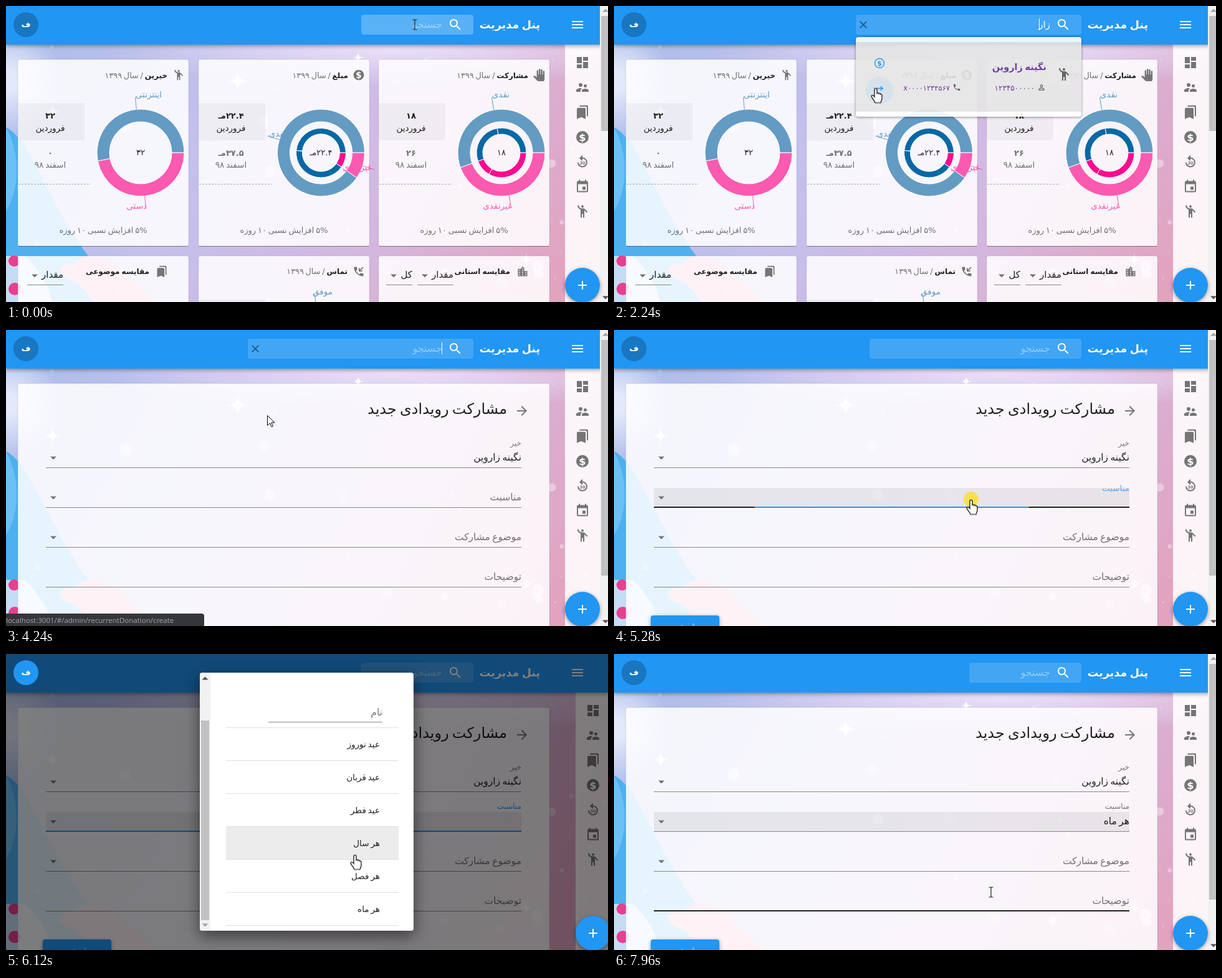
Write an HTML page that moves like this. It is 966 px wide and 476 px high and loops after 8 s.

```html
<!DOCTYPE html>
<html lang="fa">
<head>
<meta charset="utf-8">
<title>پنل مدیریت</title>
<style>
html, body { margin: 0; width: 100%; height: 100%; overflow: hidden; }
svg {
  display: block; width: 966px; height: 476px;
  background:
    radial-gradient(90px 90px at 0 120px, #e3e8fa 20%, #e3e8fa00),
    radial-gradient(460px 60px at 620px 70px, #e9e0f8, #e9e0f800),
    linear-gradient(118deg, #a9bdea, #c3c0ec 35%, #d3b9e2 62%, #e2a3bf 92%);
}
text { font-family: "DejaVu Sans", sans-serif; direction: rtl; word-spacing: -.1em; fill: #000; fill-opacity: .87; }
.dim { fill-opacity: .54; }
.b { font-weight: 700; }
.mid { text-anchor: middle; }
.white { fill: #fff; fill-opacity: 1; }
.hint { fill: #fff; fill-opacity: .42; }
.blue { fill: #649bc3; fill-opacity: 1; }
.pink { fill: #fb5ab1; fill-opacity: 1; }
.link { fill: #551a8b; fill-opacity: .9; }
.red { fill: #f44336; fill-opacity: 1; }
.primary { fill: #2196f3; fill-opacity: 1; }
.ltr { direction: ltr; font-family: "Open Sans", sans-serif; fill: #a2a6ab; fill-opacity: 1; }
.shade { filter: drop-shadow(0 2px 3px #0006); }

/* 1% = 80 ms; everything holds between steps */
[id], .shift { animation: 8s step-end infinite; }
#dash { animation-name: dash; }
#form { animation-name: form; }
#box { animation-name: box; }
#hint { animation-name: hint; }
#typed1 { animation-name: typed1; }
#typed2 { animation-name: typed2; }
#typed3 { animation-name: typed3; }
#caret { animation-name: caret; }
#clear { animation-name: clear; }
#drop { animation-name: drop; }
#rowHover, #linkHover { animation-name: dropHover; }
#status { animation-name: status; }
#pageThumb { animation-name: pageThumb; }
#pageBar { animation-name: pageBar; }
.shift { animation-name: shift; }
#modal, #scrim { animation-name: modal; }
#avatar { animation-name: avatar; }
#list { animation-name: list; }
#listThumb { animation-name: listThumb; }
#option { animation-name: option; }
#idle { animation-name: idle; }
#over { animation-name: over; }
#filled { animation-name: filled; }
#ink { animation-name: ink; transform-origin: 445.5px 0; }
#rising { animation-name: rising; }
#raised { animation-name: raised; }
#error { animation-name: error; }
#done, #noteHover { animation-name: done; }
#lower { animation-name: lower; }
#cursor { animation-name: move; }
#beam { animation-name: beam; }
#arrow { animation-name: arrow; }
#hand { animation-name: hand; }
#click { animation-name: click; }

@keyframes dash { 0% { opacity: 1 } 50.5% { opacity: 0 } }
@keyframes form { 0% { opacity: 0 } 50.5% { opacity: 1 } }
@keyframes box {
  0% { x: 570px; width: 180px; fill-opacity: .25 }
  2.5% { x: 470px; width: 280px; fill-opacity: .25 }
  5% { x: 388px; width: 362px; fill-opacity: .25 }
  20% { x: 388px; width: 362px; fill-opacity: .15 }
  66% { x: 410px; width: 340px; fill-opacity: .15 }
  68.5% { x: 570px; width: 180px; fill-opacity: .15 }
}
@keyframes hint { 0%, 50.5% { opacity: 1 } 10% { opacity: 0 } }
@keyframes typed1 { 0%, 13% { opacity: 0 } 10% { opacity: 1 } }
@keyframes typed2 { 0%, 15.5% { opacity: 0 } 13% { opacity: 1 } }
@keyframes typed3 { 0%, 50.5% { opacity: 0 } 15.5% { opacity: 1 } }
@keyframes caret {
  0% { opacity: 0; transform: none }
  2.5% { opacity: 1; transform: none }
  10% { opacity: 1; transform: translateX(-8px) }
  13% { opacity: 1; transform: translateX(-12px) }
  15.5% { opacity: 1; transform: translateX(-17px) }
  38% { opacity: 0; transform: translateX(-17px) }
  50.5% { opacity: 1; transform: none }
  66% { opacity: 0; transform: none }
}
@keyframes clear { 0%, 66% { opacity: 0 } 5% { opacity: 1 } }
@keyframes drop { 0%, 50.5% { opacity: 0 } 18% { opacity: .91 } }
@keyframes dropHover { 0% { opacity: 0 } 25.5% { opacity: 1 } }
@keyframes status { 0%, 55.5% { opacity: 0 } 30.5% { opacity: 1 } }
@keyframes pageThumb { 0% { height: 185px } 50.5% { height: 379px } }
@keyframes pageBar { 0%, 91.5% { opacity: 1 } 68.5% { opacity: 0 } }
@keyframes shift { 0%, 91.5% { transform: none } 68.5% { transform: translateX(17px) } }
@keyframes modal { 0%, 91.5% { opacity: 0 } 68.5% { opacity: 1 } }
@keyframes avatar { 0%, 91.5% { fill: #1976c0 } 68.5% { fill: #2196f3 } }
@keyframes list { 0% { transform: translateY(76px) } 73.5% { transform: none } }
@keyframes listThumb { 0% { transform: translateY(-59px) } 73.5% { transform: none } }
@keyframes option {
  0% { opacity: 0; transform: none }
  73.5% { opacity: 1; transform: none }
  81.5% { opacity: 1; transform: translateY(53px) }
  84% { opacity: 1; transform: translateY(106px) }
}
@keyframes idle { 0% { opacity: 1 } 66% { opacity: 0 } }
@keyframes over { 0%, 68.5% { opacity: 0 } 60.5% { opacity: 1 } }
@keyframes filled { 0%, 86.5% { opacity: 0 } 66%, 91.5% { opacity: 1 } }
@keyframes ink {
  0%, 86.5% { opacity: 0; transform: none }
  66% { opacity: 1; transform: scaleX(.577) }
  68.5% { opacity: 1; transform: none }
}
@keyframes rising { 0%, 68.5% { opacity: 0 } 66% { opacity: .75 } }
@keyframes raised { 0%, 86.5% { opacity: 0 } 68.5% { opacity: 1 } }
@keyframes error { 0%, 91.5% { opacity: 0 } 86.5% { opacity: 1 } }
@keyframes done { 0% { opacity: 0 } 91.5% { opacity: 1 } }
@keyframes lower { 0%, 91.5% { transform: none } 86.5% { transform: translateY(20px) } }
@keyframes move {
  0% { transform: translate(656px, 30px) }
  20% { transform: translate(640px, 110px) }
  23% { transform: translate(560px, 225px) }
  25.5% { transform: translate(470px, 160px) }
  28% { transform: translate(420px, 131px) }
  50.5% { transform: translate(419px, 137px) }
  55.5% { transform: translate(450px, 165px) }
  58% { transform: translate(515px, 215px) }
  60.5% { transform: translate(573px, 268px) }
  63.5% { transform: translate(573px, 272px) }
  71% { transform: translate(566px, 300px) }
  73.5% { transform: translate(560px, 322px) }
  81.5% { transform: translate(558px, 350px) }
  84% { transform: translate(557px, 395px) }
  86.5% { transform: translate(557px, 410px) }
  94% { transform: translate(585px, 396px) }
  97% { transform: translate(605px, 383px) }
}
@keyframes beam { 0%, 91.5% { opacity: 1 } 20% { opacity: 0 } }
@keyframes arrow { 0%, 25.5%, 60.5% { opacity: 0 } 23%, 50.5% { opacity: 1 } }
@keyframes hand { 0%, 23%, 50.5%, 91.5% { opacity: 0 } 20%, 25.5%, 60.5% { opacity: 1 } }
@keyframes click { 0%, 5%, 43%, 68.5%, 91.5% { opacity: 0 } 2.5%, 40.5%, 66%, 86.5% { opacity: .75 } }
</style>
</head>
<body>
<svg viewBox="0 0 966 476"></svg>
<script>
const GRAY = '#757575', BLUE = '#2196f3';
const PERSON = 'نگینه زاروین';
const ICONS = {
  menu: 'M3 18h18v-2H3zm0-5h18v-2H3zm0-7v2h18V6z',
  search: 'M15.5 14h-.8l-.3-.3A6.5 6.5 0 1 0 13.7 14.4l.3.3v.8l5 5 1.5-1.5zM9.5 14a4.5 4.5 0 1 1 0-9 4.5 4.5 0 0 1 0 9z',
  dashboard: 'M3 13h8V3H3zm0 8h8v-6H3zm10 0h8V11h-8zm0-18v6h8V3z',
  people: 'M16.5 12a2.5 2.5 0 1 0 0-5 2.5 2.5 0 0 0 0 5zM9 11a3 3 0 1 0 0-6 3 3 0 0 0 0 6zm7.5 3c-1.8 0-5.5.9-5.5 2.8V19h11v-2.2c0-1.9-3.7-2.8-5.5-2.8zM9 13c-2.3 0-7 1.2-7 3.5V19h7v-2.2c0-.9.3-2.4 2.4-3.5z',
  bookmarks: 'M19 18l2 1V3a2 2 0 0 0-2-2H9a2 2 0 0 0-2 2h10a2 2 0 0 1 2 2zM15 5H5a2 2 0 0 0-2 2v16l7-3 7 3V7a2 2 0 0 0-2-2z',
  disc: 'M12 2a10 10 0 1 0 0 20 10 10 0 0 0 0-20z',
  replay: 'M12 5V1L7 6l5 5V7a6 6 0 1 1-6 6H4a8 8 0 1 0 8-8z',
  event: 'M17 12h-5v5h5zM16 1v2H8V1H6v2H5a2 2 0 0 0-2 2v14a2 2 0 0 0 2 2h14a2 2 0 0 0 2-2V5a2 2 0 0 0-2-2h-1V1zm3 18H5V8h14z',
  wave: 'M12 2a2 2 0 1 0 0 4 2 2 0 0 0 0-4zM15.9 8.1C15.5 7.7 14.8 7 13.5 7H11A5 5 0 0 1 6 2H4a7 7 0 0 0 5 6.7V22h2v-6h2v6h2V10l4 4 1.4-1.4z',
  palm: 'M23 5.5V20a4 4 0 0 1-4 4h-7.3a4 4 0 0 1-2.9-1.2L1 14.8l1.3-1.2a1.2 1.2 0 0 1 1.4-.1L8 15.9V4a1.5 1.5 0 0 1 3 0v7h1V1.5a1.5 1.5 0 0 1 3 0V11h1V2.5a1.5 1.5 0 0 1 3 0V11h1V5.5a1.5 1.5 0 0 1 3 0z',
  plus: 'M19 13h-6v6h-2v-6H5v-2h6V5h2v6h6z',
  phone: 'M20 15.5c-1.2 0-2.4-.2-3.6-.6-.3-.1-.7 0-1 .3l-2.2 2.2a15 15 0 0 1-6.6-6.6l2.2-2.2c.3-.3.4-.7.3-1C8.7 6.4 8.5 5.2 8.5 4a1 1 0 0 0-1-1H4a1 1 0 0 0-1 1 17 17 0 0 0 17 17 1 1 0 0 0 1-1v-3.5a1 1 0 0 0-1-1z',
  incoming: 'M21 4.4 19.6 3 14 8.6V5h-2v7h7v-2h-3.6z',
  city: 'M15 11V5l-3-3-3 3v2H3v14h18V11zM7 19H5v-2h2zm0-4H5v-2h2zm0-4H5V9h2zm6 8h-2v-2h2zm0-4h-2v-2h2zm0-4h-2V9h2zm0-4h-2V5h2zm6 12h-2v-2h2zm0-4h-2v-2h2z',
  close: 'M19 6.4 17.6 5 12 10.6 6.4 5 5 6.4l5.6 5.6L5 17.6 6.4 19l5.6-5.6 5.6 5.6 1.4-1.4-5.6-5.6z',
  forward: 'M12 4l-1.4 1.4L16.2 11H4v2h12.2l-5.6 5.6L12 20l8-8z',
  user: 'M12 4a4 4 0 1 0 0 8 4 4 0 0 0 0-8zm0 2a2 2 0 1 1 0 4 2 2 0 0 1 0-4zm0 7c-2.7 0-8 1.3-8 4v3h16v-3c0-2.7-5.3-4-8-4zm6 5H6v-1c0-.6 3-2 6-2s6 1.4 6 2z',
  share: 'M14 4v4H9a5 5 0 0 0-5 5v5h2v-5a3 3 0 0 1 3-3h5v4l6-5z'
};

const text = (x, y, size, str, cls = '', more = '') =>
  `<text x="${x}" y="${y}" font-size="${size}" class="${cls}" ${more}>${str}</text>`;
const rect = (x, y, w, h, fill, more = '') =>
  `<rect x="${x}" y="${y}" width="${w}" height="${h}" fill="${fill}" ${more}/>`;
const circle = (x, y, r, fill, more = '') => `<circle cx="${x}" cy="${y}" r="${r}" fill="${fill}" ${more}/>`;
const path = (d, fill, more = '') => `<path d="${d}" fill="${fill}" ${more}/>`;
const group = (attrs, ...parts) => `<g ${attrs}>${parts.join('')}</g>`;
const icon = (name, x, y, size = 24, fill = GRAY) =>
  path(ICONS[name], fill, `fill-rule="evenodd" transform="translate(${x - size / 2} ${y - size / 2}) scale(${size / 24})"`);
const coin = (x, y, size = 24) =>
  icon('disc', x, y, size) + text(x, y + size * .24, size * .68, '$', 'white b mid');
const triangle = (x, y, fill = GRAY, dir = 1) => path(`M${x - 5} ${y - 2.5 * dir}h10l-5 ${5 * dir}z`, fill);
const rule = (x, y, w, fill = '#888', h = 1) => rect(x, y, w, h, fill);

function backdrop() {
  let seed = 7;
  const random = () => (seed = seed * 16807 % 2147483647) / 2147483647;
  const star = (x, y, r) => path(`M${x} ${y - r}Q${x} ${y} ${x + r} ${y}Q${x} ${y} ${x} ${y + r}Q${x} ${y} ${x - r} ${y}Q${x} ${y} ${x} ${y - r}`, '#fff') +
    circle(x, y, r / 4, '#fff');
  const bokeh = Array.from({ length: 70 }, () =>
    circle(random() * 966, 65 + random() * 411, 1 + random() ** 3 * 9, '#fff', `opacity="${.15 + random() * .35}"`)).join('');
  return path('M0 195C40 215 70 320 132 402L150 476H0z', '#4fb0f0') +
    path('M0 195C25 240 20 300 0 330z', '#6cc0f4') +
    path('M30 402C50 420 70 450 74 476H0V402z', '#c5dcf5') +
    path('M86 424q4-12 24-8 8-16 34-14 34 6 50 34 22 14 48 40H140q-14-20-30-34-24-6-24-18z', '#f3a3c4') +
    circle(13, 410, 9, '#e8408f') + circle(14, 455, 10, '#e8408f') + bokeh +
    star(372, 121, 18) + star(75, 170, 14) + star(565, 83, 9) + star(835, 408, 10);
}

const card = (x, y, w, h) =>
  rect(x, y, w, h, '#fff', 'rx="3" fill-opacity=".86" stroke="#000" stroke-opacity=".09"') +
  rule(x + 1, y + h, w - 2, '#0005');

function polar(cx, r, deg) {
  const a = deg * Math.PI / 180;
  return `${(cx + r * Math.cos(a)).toFixed(1)} ${(236 - r * Math.sin(a)).toFixed(1)}`;
}
function slice(cx, r0, r1, from, to, fill) {
  const big = +(to - from > 180);
  return path(`M${polar(cx, r1, from)}A${r1} ${r1} 0 ${big} 0 ${polar(cx, r1, to)}L${polar(cx, r0, to)}A${r0} ${r0} 0 ${big} 1 ${polar(cx, r0, from)}z`,
    fill, 'stroke="#fff"');
}
function donut(cx, split, inner, labels) {
  const tones = ['#649bc3', '#fb5ab1'], deep = ['#0868a4', '#fa0b90'];
  const bounds = [0, split, 360];
  const outer = tones.map((c, i) => slice(cx, 50, 70, bounds[i], bounds[i + 1], c) +
    path(`M${polar(cx, 70, (bounds[i] + bounds[i + 1]) / 2)}L${polar(cx, 90, (bounds[i] + bounds[i + 1]) / 2)}`, 'none', `stroke="${c}"`));
  const core = inner.slice(1).map((to, i) => slice(cx, 30, 40, inner[i], to, deep[+(to > split)]));
  const names = labels.map(([x, y, str], i) => text(x, y, 13.5, str, i ? 'pink' : 'blue'));
  return [...outer, ...core, ...names].join('');
}

const heading = (x, y, name) =>
  text(x, y, 12.8, `<tspan class="b" font-size="12">${name}</tspan><tspan class="dim"> / سال ۱۳۹۹</tspan>`);
function summary(x, name, now, before, cx) {
  return card(x, 86, 274, 300) + heading(x + 240, 116, name) +
    rect(x, 156, 107, 60, '#000', 'fill-opacity=".04"') +
    text(x + 52, 181, 13, now, 'b mid') + text(x + 52, 201, 13.5, 'فروردین', 'mid') +
    text(x + 52, 241, 13, before, 'b mid dim') + text(x + 52, 260, 13.5, 'اسفند ۹۸', 'mid dim') +
    path(`M${x + 1} 286.5h116`, 'none', 'stroke="#aaa" stroke-dasharray="3 2"') +
    text(x + 137, 365, 13, '۵% افزایش نسبی ۱۰ روزه', 'mid dim') +
    text(cx, 240, 13, now, 'mid');
}
const select = (left, right, str) =>
  text(right, 437, 15, str) + triangle(left + 12, 434) + rule(left, 448, right - left);

const dashboard = () => group('id="dash"',
  summary(598, 'مشارکت', '۱۸', '۲۶', 795), icon('palm', 855, 111, 20),
  donut(795, 200, [0, 100, 200, 240, 360], [[808, 147, 'نقدی'], [812, 326, 'غیرنقدی']]),
  summary(309, 'مبلغ', '۲۲.۴مـ', '۳۷.۵مـ', 505.5), coin(566, 111, 20),
  donut(505.5, 325, [0, 175, 325, 360], [[450, 210, 'نقدی'], [587, 264, 'غیرنقدی']]),
  summary(19, 'خیرین', '۳۲', '۰', 216), icon('wave', 277, 111, 20),
  donut(216, 191, [0], [[250, 147, 'اینترنتی'], [226, 326, 'دستی']]),
  card(598, 402, 274, 90), icon('city', 829, 427, 20), text(809, 431, 12, 'مقایسه استانی', 'b'),
  select(660, 718, 'مقدار'), select(610, 652, 'کل'),
  card(309, 402, 274, 90), icon('phone', 566, 427, 20), icon('incoming', 566, 427, 20), heading(548, 431, 'تماس'),
  text(524, 464, 13.5, 'موفق', 'blue'), path('M495 462l2 14', 'none', 'stroke="#649bc3"'),
  rect(309, 472, 107, 4, '#000', 'fill-opacity=".04"'),
  card(19, 402, 274, 90), icon('bookmarks', 250, 427, 20), text(230, 431, 12, 'مقایسه موضوعی', 'b'),
  select(34, 92, 'مقدار'));

const line = (y, fill, h = 1) => rule(64, y, 763, fill, h);
const form = () => group('id="form"',
  card(19, 86, 853, 420), icon('forward', 828, 130), text(804, 135, 24, 'مشارکت رویدادی جدید'),
  text(827, 186, 12, 'خیر', 'dim'), text(827, 210, 15.5, PERSON), line(221), triangle(76, 206),
  rect(64, 254, 763, 31, '#000', 'id="filled" fill-opacity=".07"'),
  line(285), triangle(76, 270),
  group('id="idle"', text(827, 274, 15.5, 'مناسبت', 'dim')),
  group('id="over"', line(284, '#212121', 2)),
  group('id="ink"', line(284, BLUE, 2)),
  group('id="rising"', text(827, 259, 13.5, 'مناسبت', 'primary')),
  group('id="raised"', text(827, 249, 12, 'مناسبت', 'primary')),
  group('id="error"', text(827, 274, 15.5, 'مناسبت', 'red'), line(284, '#f44336', 2),
    text(827, 303, 11.5, 'مناسبت را وارد نمایید', 'red')),
  group('id="done"', text(827, 249, 12, 'مناسبت', 'dim'), text(827, 274, 15.5, 'هر ماه')),
  group('id="lower"',
    text(827, 338, 15.5, 'موضوع مشارکت', 'dim'), line(349), triangle(76, 334),
    text(827, 402, 15.5, 'توضیحات', 'dim'), line(413),
    group('id="noteHover"', line(412, '#212121', 2)),
    rect(59, 459, 110, 36, BLUE, 'rx="4" class="shade"'), text(116, 481, 15, 'ثبت', 'white b mid')));

const appBar = () => rect(0, 0, 966, 62, BLUE, 'class="shade"') +
  icon('menu', 917, 30, 24, '#fff') + text(857, 36, 17.5, 'پنل مدیریت', 'white b') +
  rect(570, 14, 180, 32, '#fff', 'id="box" rx="4"') + icon('search', 721, 30, 24, '#fff') +
  text(700, 35, 16, 'جستجو', 'hint', 'id="hint"') +
  ['ز', 'زا', 'زار'].map((s, i) => text(700, 35, 15, s, 'white', `id="typed${i + 1}"`)).join('') +
  rect(699, 20, 1, 19, '#fff', 'id="caret"') +
  group('id="clear"', icon('close', 400, 30, 20, '#15558c'));

const sideBar = () => group('class="shift"',
  rect(897, 62, 70, 414, '#fff', 'fill-opacity=".88"'),
  ['dashboard', 'people', 'bookmarks', , 'replay', 'event', 'wave'].map((n, i) => icon(n, 925, 91 + i * 39.9)).join(''),
  coin(925, 211), text(925, 255, 6.5, '30', 'b mid dim'));

const dropdown = () => group('id="drop"',
  rect(388, 50, 362, 128, '#fff', 'rx="4" style="filter:drop-shadow(0 1px 2px #0007)"'),
  rect(388, 58, 362, 112, '#000', 'id="rowHover" fill-opacity=".1"'),
  icon('wave', 722, 110, 24, '#555'), text(694, 103, 14.5, PERSON, 'link b'),
  icon('user', 686, 131, 14, '#555'), text(675, 136, 12, '۱۲۳۴۵۰۰۰۰۰', 'link'),
  icon('phone', 550, 131, 14, '#555'), text(539, 136, 11.5, 'x۰۰۰۰۱۲۳۴۵۶۷', 'link'),
  circle(426, 92, 7.5, 'none', `stroke="${BLUE}" stroke-width="1.6"`), text(426, 96, 11, '$', 'primary b mid'),
  circle(426, 136, 22, '#d3dfe9', 'id="linkHover"'), icon('share', 426, 135, 20, BLUE));

const pageBar = () => group('id="pageBar"', rect(953, 0, 13, 476, '#f1f1f1'),
  rect(955, 16, 11, 185, '#c1c1c1', 'id="pageThumb"'), triangle(962, 7, '#a3a3a3', -1), triangle(962, 469, '#505050'));

const OPTIONS = ['عید نوروز', 'عید قربان', 'عید فطر', 'هر سال', 'هر فصل', 'هر ماه'];
const dialog = () => group('id="modal"',
  '<clipPath id="sheet"><rect x="311" y="30" width="343" height="415" rx="4"/></clipPath>',
  rect(311, 30, 343, 415, '#fff', 'rx="4" style="filter:drop-shadow(0 8px 12px #0008)"'),
  group('clip-path="url(#sheet)"',
    group('id="list"', text(604, 99, 15.5, 'نام', 'dim'), rule(421, 109, 183),
      rect(353, 278, 277, 52, '#ececec', 'id="option"'), rule(353, 118, 277, '#e0e0e0'),
      OPTIONS.map((s, i) => text(600, 150 + i * 53, 13.5, s) + rule(353, 171 + i * 53, 277, '#e0e0e0')).join('')),
    rect(311, 30, 17, 415, '#f1f1f1'), rect(313, 107, 13, 321, '#c1c1c1', 'id="listThumb"'),
    triangle(319.5, 39, '#505050', -1), triangle(319.5, 436, '#a3a3a3')));

const pointer = () => group('id="cursor"',
  circle(0, 0, 12, '#ffe11a', 'id="click"'),
  path('M-3.5-8H-1L0-7 1-8H3.5M0-7V7M-3.5 8H-1L0 7 1 8H3.5', 'none', 'id="beam" stroke="#222" stroke-width="1.2"'),
  path('M.5.5V16.5l4-3.7 2.6 6 2.3-1-2.6-5.8H12z', '#fff', 'id="arrow" stroke="#000"'),
  path('M-2 1.5C-2-.8 2-.8 2 1.5V8c.8-1 3-1 3 .6.8-1 2.8-.6 2.8 1 .8-.6 2.2 0 2.2 1.4v5c0 3-1.5 4-2 7H-1C-2 19-7 15-7 12.5c0-2 3-2 5 1z',
    '#fff', 'id="hand" stroke="#000" stroke-width="1.2" transform="translate(0 1.5)"'));

document.querySelector('svg').innerHTML = [
  backdrop(), dashboard(), form(), sideBar(), appBar(), dropdown(), pageBar(),
  group('id="scrim"', rect(0, 0, 966, 476, '#000', 'fill-opacity=".5"')),
  circle(32, 30, 20, '#1976c0', 'id="avatar"'), text(32, 34, 13, 'ف', 'white b mid'),
  dialog(),
  group('class="shift"', circle(925, 449, 28, BLUE, 'class="shade"'), icon('plus', 925, 449, 24, '#fff')),
  group('id="status"', path('M0 456h314q4 0 4 4v16H0z', '#35363a'),
    text(0, 471, 11.5, 'localhost:3001/#/admin/recurrentDonation/create', 'ltr')),
  pointer()
].join('');
</script>
</body>
</html>
```
